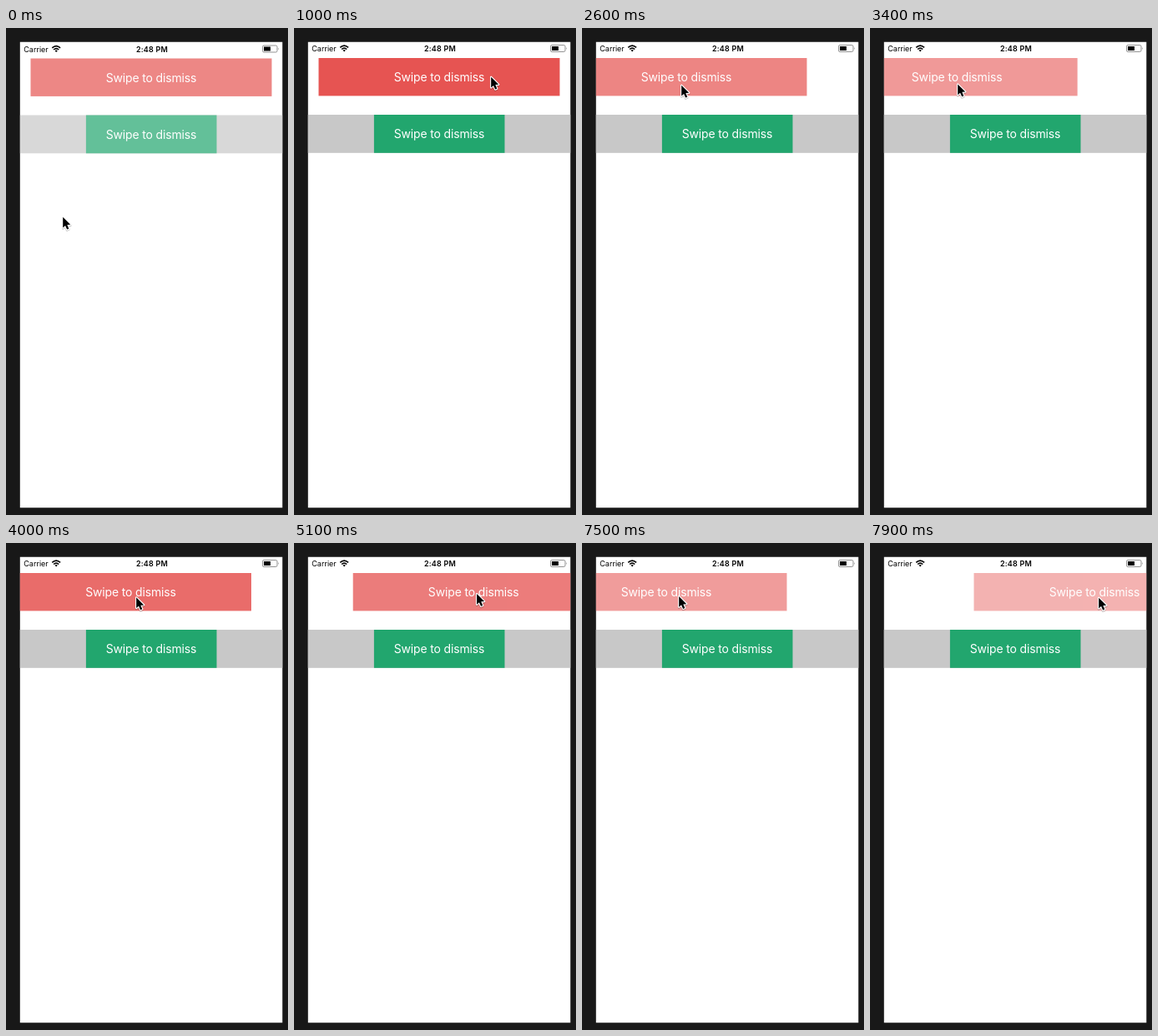
An HTML page for the animation above (8 s loop, 338x584 px).

```html
<!DOCTYPE html>
<html lang="en">
<head>
<meta charset="utf-8">
<title>Swipe to dismiss</title>
<style>
  html, body { margin: 0; width: 100%; height: 100%; overflow: hidden; background: #181818; }
  svg { display: block; width: 100%; height: 100%; }
  text { font-family: Inter, Roboto, sans-serif; }
  .label { font-size: 14px; letter-spacing: -.15px; fill: #fff; text-anchor: middle; }
  .status { font-size: 9px; fill: #000; }
  .clock { font-weight: 600; letter-spacing: .2px; text-anchor: middle; }
</style>
</head>
<body>
<svg viewBox="0 0 338 584">
  <defs>
    <clipPath id="frame"><rect x="16.8" y="16.8" width="314.5" height="558.4"/></clipPath>
    <path id="arrow" d="M0 0V14.6L3.3 11.6L5.7 17L8.2 15.9L5.9 10.7L10.4 10.4Z"/>
  </defs>
  <g clip-path="url(#frame)">
    <rect x="16" y="16" width="316" height="560" fill="#fff"/>
    <g id="screen">
      <g id="content">
        <g id="card">
          <rect x="29.5" y="36" width="289" height="45.4" fill="#e65452"/>
          <text class="label" x="174" y="64">Swipe to dismiss</text>
        </g>
        <rect x="16" y="104" width="316" height="45.8" fill="#c8c8c8"/>
        <rect x="95.9" y="104" width="156.6" height="45.8" fill="#22a66e"/>
        <text class="label" x="174" y="132">Swipe to dismiss</text>
      </g>
      <text class="status" x="21.3" y="28">Carrier</text>
      <g fill="none" stroke="#000" stroke-width="1.6">
        <path d="M55.3 23.4Q60.2 18.9 65.1 23.4"/>
        <path d="M57.1 25.5Q60.2 22.7 63.3 25.5"/>
        <path d="M58.6 26.7Q60.2 25.4 61.8 26.7L60.2 28.4Z" fill="#000" stroke="none"/>
      </g>
      <text class="status clock" x="175" y="28">2:48 PM</text>
      <rect x="307.5" y="20.5" width="17.5" height="8" rx="1.6" fill="#fff" stroke="#777" stroke-width=".8"/>
      <rect x="309" y="22" width="8" height="5" fill="#000"/>
      <path d="M326 23q1.3 1.5 0 3z" fill="#777"/>
    </g>
  </g>
  <g id="cursor">
    <g transform="translate(1.2 1.8) scale(.87)" stroke-linejoin="round">
      <use href="#arrow" y="1.2" opacity=".2" stroke="#000" stroke-width="3"/>
      <use href="#arrow" stroke="#fff" stroke-width="2.6" paint-order="stroke"/>
    </g>
  </g>
</svg>
<script>
const LOOP = 8000, STEP = 100, FADE = 200, ARRIVE = 1000;

// Turning points of the swipe: card offset, and where the pointer holds the card at rest
const turns = [
  { at: ARRIVE, offset: 0, grip: 235 },
  { at: 1500, offset: 60, grip: 220 },
  { at: 2600, offset: -49, grip: 167 },
  { at: 3100, offset: -85, grip: 172 },
  { at: 4000, offset: -24.5, grip: 179.5 },
  { at: 5900, offset: 81, grip: 175 },
  { at: 6400, offset: 0, grip: 180 },
  { at: 7100, offset: 0, grip: 186 },
  { at: 7500, offset: -73, grip: 188 },
  { at: 7900, offset: 95, grip: 178 }
];

const el = id => document.getElementById(id);
const screen = el("screen"), content = el("content"), card = el("card"), cursor = el("cursor");

const mix = (a, b, p) => a + (b - a) * p;
const clamp = p => Math.min(Math.max(p, 0), 1);
const ease = p => (1 - Math.cos(Math.PI * clamp(p))) / 2;

function swipe(t) {
  const i = Math.max(1, turns.findIndex(turn => turn.at >= t));
  const a = turns[i - 1], b = turns[i];
  const p = ease((t - a.at) / (b.at - a.at));
  return { offset: mix(a.offset, b.offset, p), grip: mix(a.grip, b.grip, p) };
}

function pointer(t, { offset, grip }) {
  const arrival = ease(t / ARRIVE);
  const drift = 62.5 + 4.5 * Math.cos(2 * Math.PI * (t - 2600) / 6600);
  const hand = mix(57, drift, ease((t - ARRIVE) / 500));
  return [mix(67, grip + offset, arrival), mix(225, hand, arrival)];
}

function draw(now) {
  const t = Math.floor((now % LOOP) / STEP) * STEP;
  const state = swipe(t);
  const entry = clamp(t / FADE);

  screen.setAttribute("transform", `translate(0 ${mix(0.5, 0, entry)})`);
  content.setAttribute("opacity", mix(0.7, 1, entry));
  card.setAttribute("transform", `translate(${state.offset} 0)`);
  card.setAttribute("opacity", 1 - Math.abs(state.offset) / 172);
  cursor.setAttribute("transform", `translate(${pointer(t, state)})`);
}

const start = performance.now();
function tick() {
  draw(performance.now() - start);
  requestAnimationFrame(tick);
}
tick();
</script>
</body>
</html>
```
